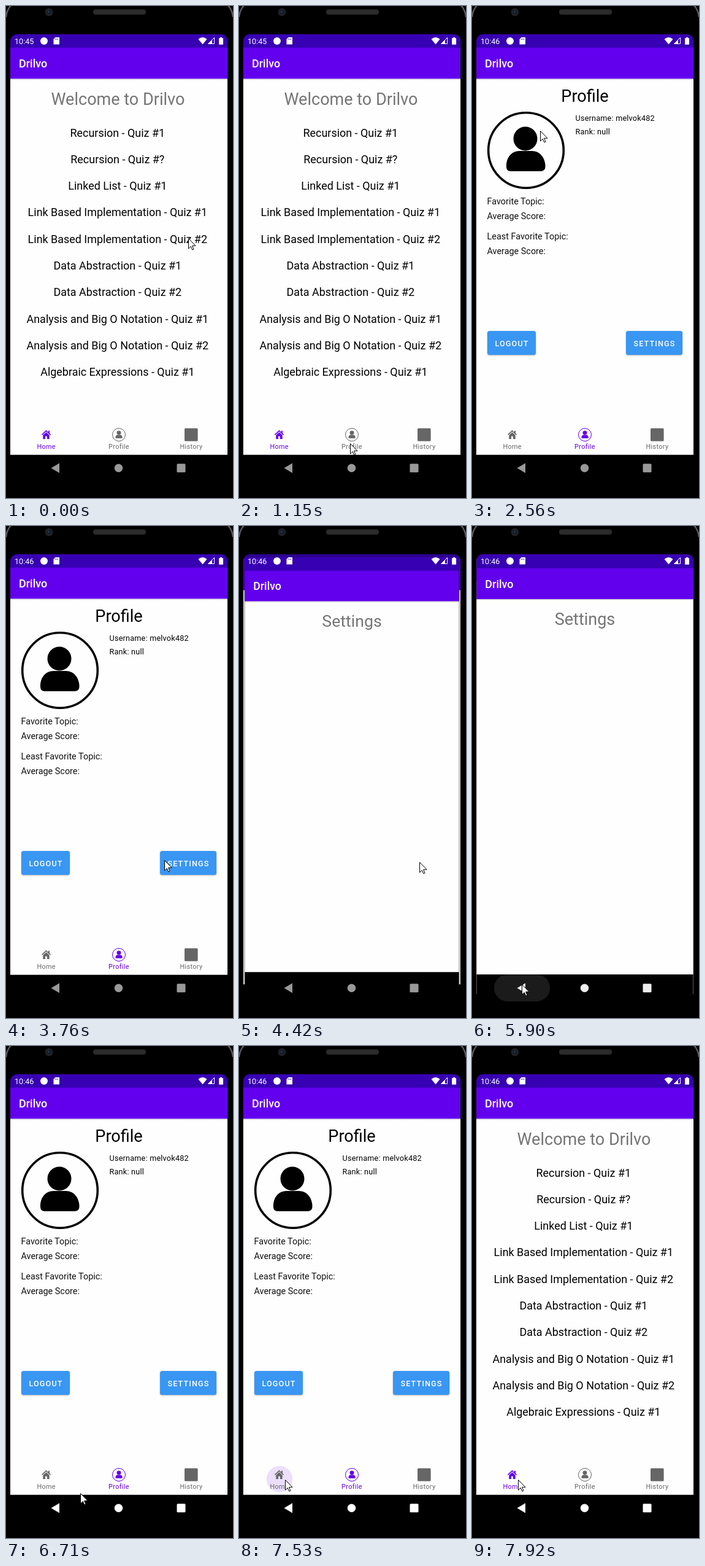
An HTML page that plays this animation: 370 px wide and 801 px high, repeating every 8000 ms.

```html
<!DOCTYPE html>
<html lang="en">
<head>
<meta charset="utf-8">
<title>Quiz app walkthrough</title>
<style>
  html, body { margin: 0; width: 100%; height: 100%; overflow: hidden; background: #000; }
  svg { display: block; width: 370px; height: 801px; font-family: Roboto, sans-serif; }
  .mid { text-anchor: middle; }
  .title { font-size: 27.04px; }
  .row { font-size: 17.95px; }
  .field { font-size: 14.42px; }
  .small { font-size: 12.62px; letter-spacing: .0178em; }
  .button { font-size: 12.62px; font-weight: 500; letter-spacing: .0892em; fill: #fff; }
  .label { font-size: 10.82px; letter-spacing: .0333em; }
  .lifted { filter: drop-shadow(0 1.5px 1px rgba(0, 0, 0, .3)); }
</style>
</head>
<body>
<svg viewBox="0 0 370 801">
  <defs>
    <clipPath id="display"><rect x="7" y="46" width="354" height="728" rx="11"/></clipPath>
    <clipPath id="tabArea"><rect x="7" y="680" width="354" height="50.7"/></clipPath>
    <clipPath id="settingsArea"><rect x="251" y="529" width="92" height="39" rx="3.5"/></clipPath>
    <linearGradient id="shade" x2="0" y2="1">
      <stop stop-color="#000" stop-opacity=".2"/>
      <stop offset="1" stop-color="#000" stop-opacity="0"/>
    </linearGradient>
    <g id="frame">
      <rect x="7" y="46" width="354" height="728"/>
      <rect x="7" y="118" width="354" height="612.7" fill="#fefefe"/>
      <rect x="7" y="118.4" width="354" height="2.6" fill="url(#shade)"/>
      <rect x="7" y="46" width="354" height="22" fill="#3700b3"/>
      <rect x="7" y="67.8" width="354" height="50.6" fill="#6200ee"/>
      <text x="21" y="100" font-size="18.03" font-weight="500" fill="#fff">Drilvo</text>
    </g>
    <g id="person">
      <circle cx="87" cy="216" r="19.5"/>
      <path d="M56 262C55 248 64 236 77 236H98C111 236 120 248 119.5 262Q119 269 112 269H63Q56 269 56 262Z"/>
    </g>
  </defs>

  <rect width="370" height="801"/>
  <path d="M8-1Q1 7 0 18M362-1Q369 7 370 18" fill="none" stroke="#5a5a5e" stroke-width="2.5"/>
  <circle cx="70" cy="10" r="6.5" fill="#202024"/>
  <circle cx="70" cy="10" r="3" fill="#10182c"/>
  <circle cx="69.5" cy="9.5" r="1.2" fill="#35456e"/>
  <rect x="142" y="5.5" width="86" height="8.5" rx="4" fill="#2b2b2b"/>

  <g clip-path="url(#display)">
    <g id="main">
      <use href="#frame"/>
      <g id="home">
        <text class="title" x="73.5" y="161" fill="#757575">Welcome to Drilvo</text>
        <g id="rows" class="row mid"></g>
      </g>
      <g id="profile">
        <text class="title mid" x="184" y="155.5">Profile</text>
        <circle cx="88" cy="235" r="61.3" fill="none" stroke="#000" stroke-width="3.6"/>
        <use href="#person"/>
        <g class="small">
          <text x="168.5" y="186.5">Username: melvok482</text>
          <text x="168.5" y="208.5">Rank: null</text>
        </g>
        <g class="field" fill="#111">
          <text x="24.5" y="323">Favorite Topic:</text>
          <text x="24.5" y="347">Average Score:</text>
          <text x="24.5" y="380">Least Favorite Topic:</text>
          <text x="24.5" y="404">Average Score:</text>
        </g>
        <g fill="#3996f3" class="lifted">
          <rect x="25" y="529" width="79" height="39" rx="3.5"/>
          <rect id="settingsButton" x="251" y="529" width="92" height="39" rx="3.5"/>
        </g>
        <circle id="press" cx="297" cy="549" fill="#fff" opacity=".24" clip-path="url(#settingsArea)"/>
        <text class="button mid" x="65" y="553.5">LOGOUT</text>
        <text class="button mid" x="297.5" y="553.5">SETTINGS</text>
      </g>
      <g clip-path="url(#tabArea)"><circle id="ripple" cy="705" fill="#6200ee"/></g>
      <g class="label mid">
        <g id="homeTab">
          <path d="M65.5 690.5L58 697.5L59 698.7L65.5 692.7L72 698.7L73 697.5L71 695.5V691.5H69V693.7ZM65.5 694L60.3 698.8V705H64V700.5H67V705H70.7V698.8Z"/>
          <text x="65.7" y="721">Home</text>
        </g>
        <g id="profileTab">
          <circle cx="184" cy="698" r="10.5" fill="none" stroke="currentColor"/>
          <use href="#person" transform="translate(168.5 658.5) scale(.178 .168)"/>
          <text x="184" y="721">Profile</text>
        </g>
        <g fill="#666">
          <rect x="291" y="687.4" width="21.6" height="21.2" rx="1.5"/>
          <text x="302" y="721">History</text>
        </g>
      </g>
      <rect id="dim" x="7" y="46" width="354" height="728" opacity=".2"/>
    </g>
    <g id="settings">
      <use href="#frame"/>
      <text class="title mid" x="184" y="161" fill="#757575">Settings</text>
    </g>
  </g>

  <g fill="#fff">
    <text id="clock" x="14" y="61.5" font-size="12.6"></text>
    <circle cx="62" cy="57" r="6"/>
    <path d="M80.5 51H87V62.5H77.5V54Z"/>
    <path d="M80.5 53V55M82.5 53V55M84.5 53V55" stroke="#3700b3" stroke-width=".8"/>
    <path d="M313.5 54Q320.5 48 327.5 54L320.5 62.5Z"/>
    <path d="M329.5 61.5H339.5V51.5Z" fill="none" stroke="#fff"/>
    <path d="M329 62H336V55Z"/>
    <path d="M349 51H352V52.2H354V62.8H347V52.2H349Z"/>
  </g>

  <rect id="pill" x="36" y="730" width="91" height="44" rx="22" fill="#1c1c1c"/>
  <g id="keys">
    <path d="M73.5 752.3L87 744.3V760.3Z"/>
    <circle cx="183.5" cy="752.2" r="6.7"/>
    <rect x="278.5" y="745.3" width="14" height="14" rx="1.5"/>
  </g>
  <path id="cursor" d="M.5.5V17L4.3 13.4L6.8 19L9 18L6.6 12.3H12Z" fill="#fff" stroke="#000"/>
</svg>

<script>
const LOOP = 8000;
const TO_PROFILE = 1900, OPEN = 4420, CLOSE = 5900, TO_HOME = 7650;
const SWIRL = { from: 2160, to: 3320, top: 2490, period: 800 };

const $ = id => document.getElementById(id);
const clamp = v => Math.max(0, Math.min(1, v));
const easeOut = p => 1 - (1 - p) ** 2;
const show = (id, on) => $(id).style.display = on ? '' : 'none';
const set = (id, attributes) => {
  for (const name in attributes) $(id).setAttribute(name, attributes[name]);
};
const zoom = (id, s) => set(id, {
  transform: `translate(184 410) scale(${s}) translate(-184 -410)`
});
const tint = (id, on) => {
  const color = on ? '#6200ee' : '#666';
  set(id, { fill: color, color });
};

const quizzes = ['Recursion - Quiz #1', 'Recursion - Quiz #?', 'Linked List - Quiz #1',
  'Link Based Implementation - Quiz #1', 'Link Based Implementation - Quiz #2',
  'Data Abstraction - Quiz #1', 'Data Abstraction - Quiz #2',
  'Analysis and Big O Notation - Quiz #1', 'Analysis and Big O Notation - Quiz #2',
  'Algebraic Expressions - Quiz #1'];
$('rows').innerHTML = quizzes.map((quiz, i) =>
  `<text x="181.8" y="${212.5 + 43.3 * i}">${quiz}</text>`).join('');

// Pointer moves: start time, end time, destination.
const moves = [
  [150, 1150, 181, 712],
  [TO_PROFILE, SWIRL.from, 256, 610],
  [SWIRL.from, SWIRL.to, 152, 173],
  [SWIRL.to, 3470, 126, 524],
  [3470, 4010, 294, 549],
  [OPEN, 4790, 298, 252],
  [4790, 4940, 228, 132],
  [4940, 5210, 59, 673],
  [5210, 5500, 81, 746],
  [6530, 6900, 135, 721],
  [6900, 7400, 75, 706]];

function pointer(t) {
  if (t > SWIRL.from && t < SWIRL.to) {
    const angle = 2 * Math.PI * (t - SWIRL.top) / SWIRL.period;
    return [184 - 138 * Math.sin(angle), 407 - 240 * Math.cos(angle)];
  }
  let [x, y] = [297, 378];
  for (const [start, end, toX, toY] of moves) {
    const p = easeOut(clamp((t - start) / (end - start)));
    x += (toX - x) * p;
    y += (toY - y) * p;
  }
  return [x, y];
}

function drawWindows(t) {
  const opening = t >= OPEN && t < CLOSE;
  const left = Math.exp((OPEN - t) / 110);
  show('settings', t >= OPEN && t < CLOSE + 120);
  show('dim', opening);
  zoom('settings', opening ? 1 - .014 * left : .998);
  zoom('main', opening ? 1.1 - .052 * left
    : t >= CLOSE && t < CLOSE + 390 ? 1 + .1 * Math.exp((CLOSE - t) / 70) : 1);
}

function drawTabs(t) {
  const onProfile = t >= TO_PROFILE && t < TO_HOME;
  show('home', !onProfile);
  show('profile', onProfile);
  show('rows', t < TO_PROFILE || t >= TO_HOME + 150);
  tint('homeTab', !onProfile);
  tint('profileTab', onProfile);
  const age = t - (t < OPEN ? TO_PROFILE : TO_HOME) + 200;
  set('ripple', {
    cx: t < OPEN ? 184 : 66,
    r: 59 * clamp(age / 225),
    opacity: .12 * clamp((460 - age) / 200)
  });
}

function drawPresses(t) {
  const pressed = t >= 4160 && t < OPEN;
  show('press', pressed);
  set('press', { r: 50 * clamp((t - 4080) / 200) });
  set('settingsButton', { class: pressed ? 'lifted' : '' });
  set('pill', { opacity: clamp((t - 5400) / 350) * clamp((CLOSE + 390 - t) / 390) });
  const grey = 153 + 102 * clamp((t - 5420) / 576);
  set('keys', { fill: `rgb(${grey},${grey},${grey})` });
}

function draw(t) {
  const [x, y] = pointer(t);
  set('cursor', { transform: `translate(${Math.round(x)} ${Math.round(y)})` });
  $('clock').textContent = t < TO_PROFILE ? '10:45' : '10:46';
  drawWindows(t);
  drawTabs(t);
  drawPresses(t);
}

const begin = performance.now();
function loop() {
  draw((performance.now() - begin) % LOOP);
  requestAnimationFrame(loop);
}
loop();
</script>
</body>
</html>
```
